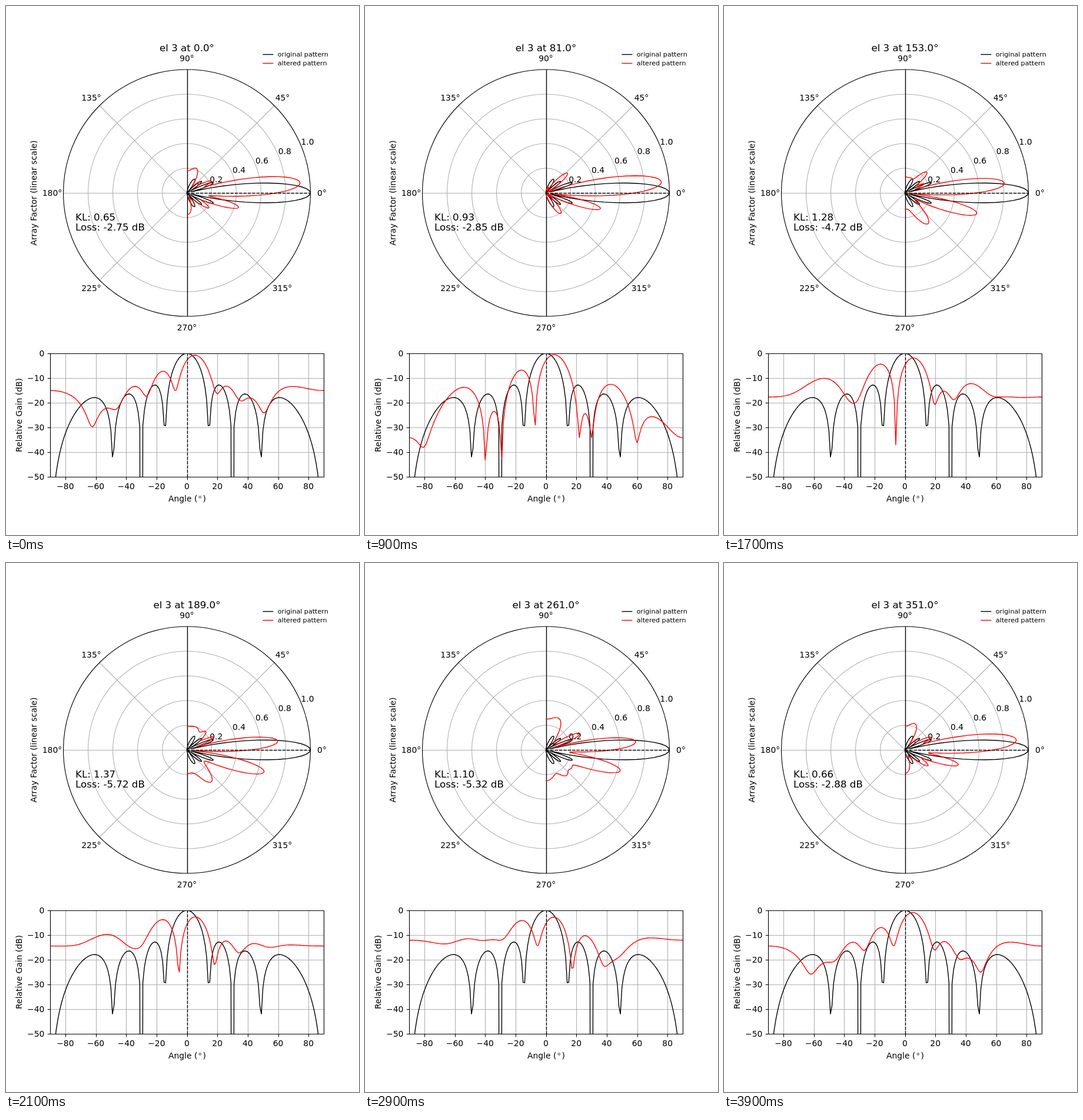
These frames come from a looping animation (600 by 900 pixels, 4 s). An HTML page:

```html
<!DOCTYPE html>
<html lang="en">
<head>
<meta charset="utf-8">
<title>Array pattern</title>
<style>
  html, body { margin: 0; width: 100%; height: 100%; overflow: hidden; background: #fff; }
  svg { display: block; width: 600px; height: 900px; }
  text { font: 13.89px "DejaVu Sans", sans-serif; white-space: pre; }
  .big { font-size: 16.67px; }
  .small { font-size: 11.11px; }
  .mid { text-anchor: middle; }
  .end { text-anchor: end; }
  path, circle { fill: none; stroke-width: 1.11; stroke: #000; }
  .grid { stroke: #b0b0b0; }
  .line { stroke-width: 1.39; stroke-linejoin: round; }
  .key { stroke-linecap: square; }
  .red { stroke: #f00; }
  .dash { stroke-dasharray: 5.14 2.22; }
</style>
</head>
<body>
<svg id="stage" viewBox="0 0 600 900">
  <clipPath id="box"><rect x="75" y="591" width="466" height="211"/></clipPath>
</svg>
<script>
const stage = document.getElementById('stage');
const CX = 307.5, CY = 318, R = 210;
const LEFT = 75.5, RIGHT = 540.5, TOP = 591.5, BOTTOM = 801.5;
const STEP_MS = 100, STEPS = 40, STEP_DEG = 9;
const ELEMENTS = 8, MOVING = 3;
const rad = deg => deg * Math.PI / 180;

function add(tag, attrs, content = '') {
  const el = document.createElementNS('http://www.w3.org/2000/svg', tag);
  for (const k in attrs) el.setAttribute(k, attrs[k]);
  el.textContent = content;
  return stage.appendChild(el);
}
const path = (d, cls) => add('path', { d, class: cls });
const label = (x, y, content, cls = '') => add('text', { x, y, class: cls }, content);
const ring = (r, cls) => add('circle', { cx: CX, cy: CY, r, class: cls });
const upright = (x, y, content) =>
  add('text', { class: 'mid', transform: `translate(${x} ${y}) rotate(-90)` }, content);

// Array power at each degree, half-wavelength spacing, phases in degrees
const angles = Array.from({ length: 181 }, (_, i) => i - 90);
function power(phases, deg) {
  let re = 0, im = 0;
  phases.forEach((p, n) => {
    const a = rad(p) + Math.PI * n * Math.sin(rad(deg));
    re += Math.cos(a);
    im += Math.sin(a);
  });
  return (re * re + im * im) / ELEMENTS ** 2;
}
const pattern = phases => angles.map(a => power(phases, a));
const dB = p => Math.max(-320, 10 * Math.log10(p + 1e-40));

function divergence(p, q) {
  const total = a => a.reduce((s, v) => s + v, 0);
  const P = total(p), Q = total(q);
  return p.reduce((s, v, i) =>
    v > 1e-20 ? s + v / P * Math.log(v / P / (q[i] / Q)) : s, 0);
}

const trace = (vals, point) =>
  'M' + vals.map((v, i) => point(v, angles[i]).map(c => c.toFixed(2)).join(' ')).join('L');
const polar = vals => trace(vals, (v, a) => {
  const r = R * Math.sqrt(v);
  return [CX + r * Math.cos(rad(a)), CY - r * Math.sin(rad(a))];
});
const gainX = a => CX + a * 465 / 180;
const gain = vals => trace(vals, (v, a) => [gainX(a), 591 - 4.2 * dB(v)]);

const base = pattern(Array(ELEMENTS).fill(0));

// Polar plot
for (const r of [0.2, 0.4, 0.6, 0.8]) ring(R * r, 'grid');
path(`M97.5 318.5H517.5`, 'grid');
for (const s of [1, -1]) {
  const d = R * Math.SQRT1_2;
  path(`M${CX - d} ${CY - s * d}L${CX + d} ${CY + s * d}`, 'grid');
}
[[537, 323], [470, 161], [CX, 94], [145, 161], [78.5, 323], [145, 485], [CX, 552], [469.5, 485]]
  .forEach(([x, y], i) => label(x, y, i * 45 + '°', 'mid'));
for (const r of [0.2, 0.4, 0.6, 0.8, 1])
  label(CX + R * r * Math.cos(rad(22.5)), CY - R * r * Math.sin(rad(22.5)) - 2, r.toFixed(1));
upright(52, CY, 'Array Factor (linear scale)');
path('M308.5 108V528', 'line');
path(polar(base), 'line');
const redPolar = path('', 'line red');
path('M308 318.5H517.5', 'line dash');
ring(R, '');

// Gain plot
for (let a = -80; a <= 80; a += 20) {
  const x = Math.floor(gainX(a) + 0.5) + 0.5;
  path(`M${x} ${TOP}V${BOTTOM}`, 'grid');
  path(`M${x} ${BOTTOM}v4.86`, '');
  label(gainX(a), 822, String(a).replace('-', '−'), 'mid');
}
for (let g = 0; g <= 50; g += 10) {
  const y = TOP + g * 4.2;
  path(`M${LEFT} ${y}H${RIGHT}`, 'grid');
  path(`M${LEFT} ${y}h-4.86`, '');
  label(65.3, y + 4.5, g ? '−' + g : '0', 'end');
}
upright(27, 696, 'Relative Gain (dB)');
label(276, 843, 'Angle (');
add('circle', { cx: 329.8, cy: 835.5, r: 1.7, style: 'stroke-width:.8' });
label(334.4, 843, ')');
const clip = el => el.setAttribute('clip-path', 'url(#box)');
clip(path(gain(base), 'line'));
const redGain = path('', 'line red');
clip(redGain);
path(`M308.5 ${BOTTOM}V${TOP}`, 'line dash');
path(`M${LEFT} ${TOP}H${RIGHT}V${BOTTOM}H${LEFT}Z`, '');

// Legend and readouts
path('M437 82.5H453.7', 'line key');
path('M437 97.5H453.7', 'line key red');
label(461.8, 86, 'original pattern', 'small');
label(461.8, 101, 'altered pattern', 'small');
const title = label(CX, 77, '', 'big mid');
const klText = label(118, 365, '', 'big');
const lossText = label(118, 382, '', 'big');

let shown = -1;
function draw(step) {
  const phase = step * STEP_DEG;
  const phases = [90, 90, 90, 0, 0, 0, 0, 0];
  phases[MOVING] = phase;
  const vals = pattern(phases);
  redPolar.setAttribute('d', polar(vals));
  redGain.setAttribute('d', gain(vals));
  title.textContent = `el ${MOVING} at ${phase.toFixed(1)}°`;
  klText.textContent = `KL: ${divergence(base, vals).toFixed(2)}`;
  lossText.textContent = `Loss: ${dB(power(phases, 0)).toFixed(2)} dB`;
}

const start = performance.now();
function tick() {
  const step = Math.floor((performance.now() - start) / STEP_MS) % STEPS;
  if (step !== shown) draw(shown = step);
  requestAnimationFrame(tick);
}
tick();
</script>
</body>
</html>
```
